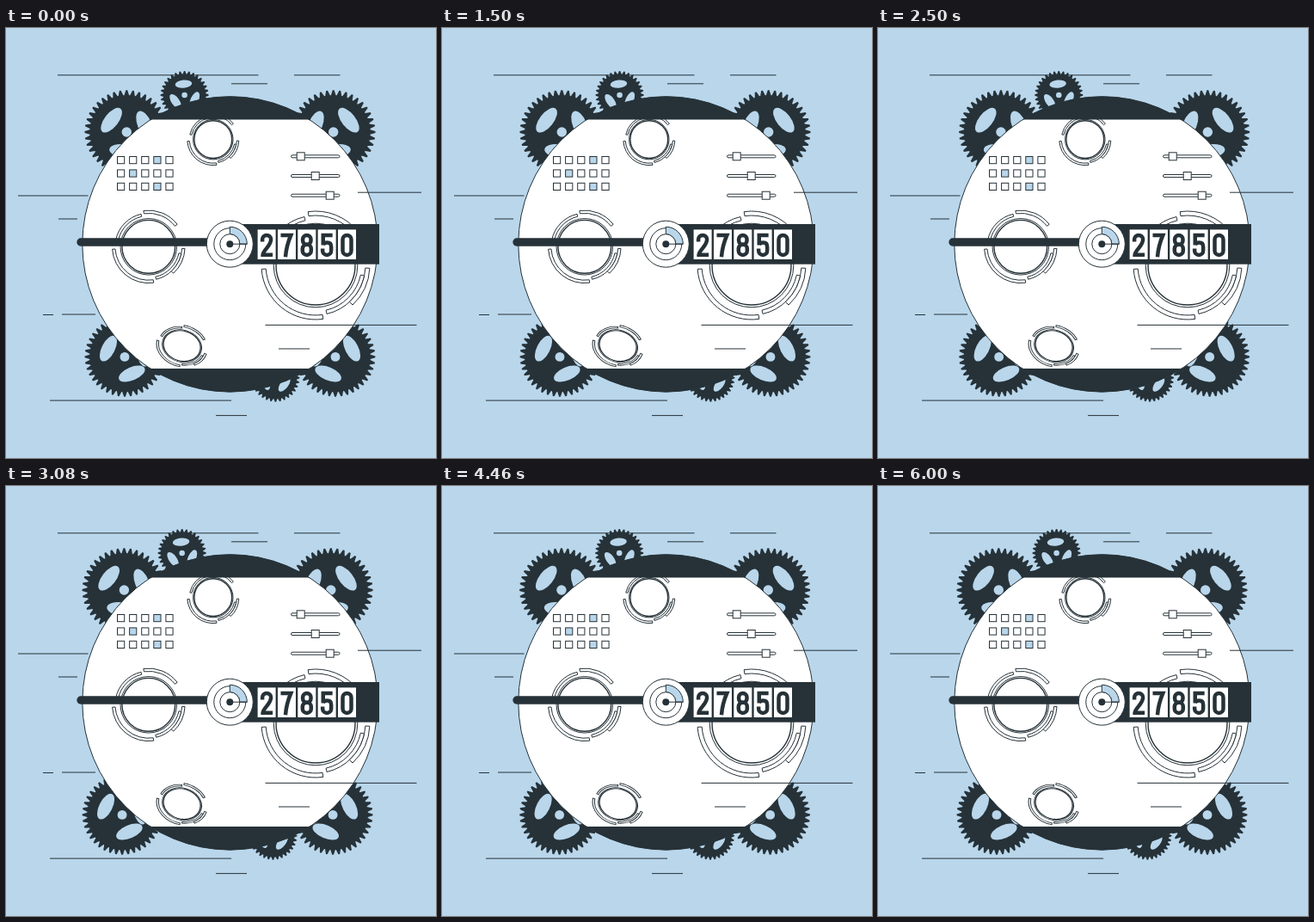
Write an HTML page that moves like this. It is 500 px wide and 500 px high and loops after 6.04 s.

```html
<!DOCTYPE html>
<html lang="en">
<head>
<meta charset="utf-8">
<title>Odometer machine</title>
<style>
  html, body { margin: 0; width: 100%; height: 100%; overflow: hidden; background: #b9d6eb; }
  svg { display: block; width: 100vw; height: 100vh; }
  .dark { fill: #263238; }
  .blue { fill: #b9d6eb; }
  .line { fill: none; stroke: #263238; }
  .box { fill: #fff; stroke: #263238; }
  .lit { fill: #b9d6eb; stroke: #263238; }
  .digit { fill: none; stroke: #263238; stroke-width: 4.5; }
</style>
</head>
<body>
<svg viewBox="0 0 500 500">
  <clipPath id="disc"><circle cx="260.5" cy="251.4" r="172"/></clipPath>
  <g id="gears"></g>
  <circle class="box" cx="260.5" cy="251.4" r="171.7"/>
  <g id="rings"></g>
  <g class="dark" clip-path="url(#disc)">
    <rect x="80" y="70" width="360" height="36.5"/>
    <rect x="80" y="396" width="360" height="40"/>
  </g>
  <g id="panel"></g>
  <rect class="dark" x="260" y="228" width="174" height="46.7"/>
  <g id="counter" role="img" aria-label="27850"></g>
  <path class="line" stroke-width="9.4" stroke-linecap="round" d="M87 249H238"/>
  <g transform="translate(260.3 251.2)">
    <circle class="box" r="27"/>
    <circle class="box" r="18.5"/>
    <path class="lit" d="M0-20A20 20 0 0 1 20 0H11.5A11.5 11.5 0 0 0 0-11.5Z"/>
    <circle class="box" r="11.5"/>
    <path class="line" d="M0 0H20"/>
    <circle class="dark" r="4"/>
  </g>
  <path class="line" d="M60 54.8H293.5M335 54.8H388.5M262 64.8H304M409 191.2H483
    M14 195H95.5M61 222H83M43 333.5H55M65 333H104
    M301.5 345.4H477.5M317 373H353M51 433.1H262M244 450.6H280"/>
</svg>
<script>
const $ = id => document.getElementById(id);
const repeat = (n, draw) => Array.from({ length: n }, (_, i) => draw(i)).join('');
const polar = (r, deg) => {
  const a = deg * Math.PI / 180;
  return `${(r * Math.cos(a)).toFixed(2)} ${(r * Math.sin(a)).toFixed(2)}`;
};

// Toothed wheel with three oval cut-outs; all parts scale with the radius
function gear(x, y, r, teeth, start, spread = 120) {
  const step = 360 / teeth;
  const rim = repeat(teeth, i =>
    [[.88, -.42], [1, -.12], [1, .12], [.88, .42]].map(([k, turn]) =>
      'L' + polar(k * r, (i + turn) * step)).join('')).replace('L', 'M');
  const ovals = repeat(3, i =>
    `<ellipse cx="${.46 * r}" rx="${.165 * r}" ry="${.35 * r}" transform="rotate(${start + i * spread})"/>`);
  return `<g transform="translate(${x} ${y})"><path class="dark" d="${rim}Z"/>
    <g class="blue">${ovals}<circle r="${.117 * r}"/></g></g>`;
}

const corners = gear(140.3, 121, 48.8, 40, 218) + gear(138, 382.4, 46.4, 40, 67, 140);
$('gears').innerHTML = corners +
  `<g transform="translate(521 0) scale(-1 1)">${corners}</g>` +
  gear(207.6, 78, 28, 32, -95) + gear(313.4, 406.7, 28, 32, 37);

// Ring gauge: two hoops inside broken bands that repeat half a turn apart
function ring(x, y, r, squash = 1, tilt = 0) {
  const band = (inner, outer, from, sweep) => {
    const p = inner * r, q = outer * r, to = from + sweep;
    return `<path class="box" d="M${polar(q, from)}A${q} ${q} 0 0 1 ${polar(q, to)}
      L${polar(p, to)}A${p} ${p} 0 0 0 ${polar(p, from)}Z"/>`;
  };
  const bands = repeat(2, i =>
    band(.85, .92, -168 + i * 180, 65) + band(.92, 1, -98 + i * 180, 60 + i * 34));
  return `<g transform="translate(${x} ${y}) rotate(${tilt}) scale(1 ${squash})">
    ${bands}${band(.92, 1, 3, 44)}
    <circle class="line" r="${.775 * r}"/>
    <circle class="line" r="${.73 * r}" stroke-width="1.4"/></g>`;
}

$('rings').innerHTML =
  ring(240.8, 129.6, 30) + ring(165.8, 254.3, 42.3) +
  ring(360, 276, 63) + ring(204.6, 369.7, 30, .8, 16);

const rect = (cls, x, y, w, h, rx = 0) =>
  `<rect class="${cls}" x="${x}" y="${y}" width="${w}" height="${h}" rx="${rx}"/>`;

const lights = repeat(15, i => {
  const row = Math.floor(i / 5), col = i % 5;
  const lit = col === (row === 1 ? 1 : 3);
  return rect(lit ? 'lit' : 'box', 129.5 + col * 14.1, 149.5 + row * 15.4, 8.2, 8.2);
});
const sliders = repeat(3, i => {
  const x = 342.7 + i * 17, y = 149.3 + i * 22.7;
  return rect('box', 331.5, y - 1.5, 56.5, 3, 1.5) + rect('box', x - 4.5, y - 4.5, 9, 9);
});
$('panel').innerHTML = lights + sliders;

// Narrow numerals drawn around their centre
const numerals = {
  0: 'M-5-6.5a5 5 0 0 1 10 0V6.5a5 5 0 0 1-10 0Z',
  2: 'M-5-4V-6.5a5 5 0 0 1 10 0Q5-3 .5 3Q-4.5 9-4.5 11.4H7',
  5: 'M6.5-11.4H-4.4V.2M-4.4 0Q-3.5-3 .5-3Q5-3 5 2V6.5a5 5 0 0 1-10 0V4',
  7: 'M-7-11.4H4.8Q-.5 1-1.5 13.8',
  8: 'M-4.7-6.8a4.7 4.7 0 0 1 9.4 0V-5.2a4.7 4.7 0 0 1-9.4 0ZM-5 4.2a5 5 0 0 1 10 0V6.5a5 5 0 0 1-10 0Z'
};
$('counter').innerHTML = [...'27850'].map((n, i) =>
  `<g transform="translate(${303.1 + i * 23.35} 252.4)">
    <rect x="-10.5" y="-18" width="21" height="34.6" fill="#fff"/>
    <path class="digit" d="${numerals[n]}"/></g>`).join('');

// Alternating swings that double up to 4 px, then halve back to rest
const swing = k => (-1) ** k * Math.min(4, Math.floor(2 ** (Math.min(k, 10 - k) - 1)));

function frame() {
  const p = Math.min(performance.now() % 6040 / 600, 10);
  const k = Math.floor(p);
  const dx = swing(k) + (swing(k + 1) - swing(k)) * (p - k);
  $('gears').setAttribute('transform', `translate(${dx} 0)`);
  requestAnimationFrame(frame);
}
frame();
</script>
</body>
</html>
```
